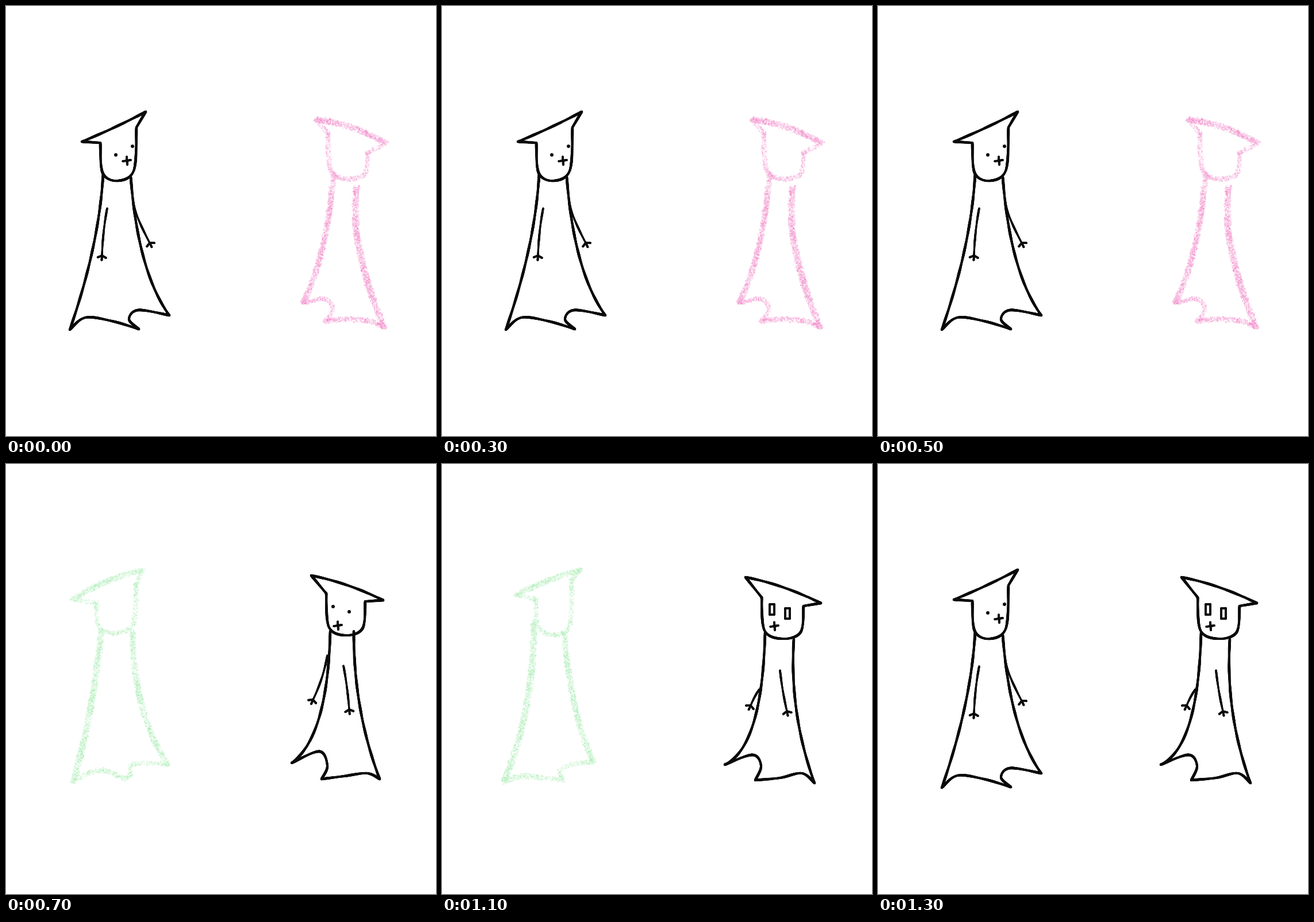
An HTML page with a canvas for the animation above (1400 ms loop, 748 by 748 pixels).

```html
<!DOCTYPE html>
<html lang="en">
<head>
<meta charset="utf-8">
<title>Two figures</title>
<style>
html, body { margin: 0; width: 100%; height: 100%; overflow: hidden; background: #fff; }
canvas { display: block; width: 100vw; height: 100vh; }
</style>
</head>
<body>
<canvas id="stage" width="748" height="748"></canvas>
<script>
const SIZE = 748, STEP = 100;
const PINK = ['#f5a3d6', '#ee7cc1', '#f8bfe2'], GREEN = ['#b6efbf', '#97e6a5', '#d3f6d4'];

// Key points. The outer side faces the stage edge, the inner side the other figure.
// hat: ear, middle, brim; face: outer temple, inner temple, chin;
// sides: neck, waist, foot; hem: two points of the wave, tail, two points of the hook.
const figures = {
  leftDots: {
    hat: '243,184 189,211 132,236', face: '164,238 227,211 195,304',
    outer: '169,292 151,422 111,563', inner: '217,297 240,440 284,538',
    hem: '138,542 184,548 231,562 214,545 230,529',
    arms: ['221,340 230,370 250,412', '176,352 170,392 167,434'],
    eyes: '191,259 220,244', mouth: '210,269'
  },
  leftBoxes: {
    hat: '252,181 194,206 136,231', face: '168,236 234,208 200,297',
    outer: '169,288 152,412 112,561', inner: '217,296 248,462 288,533',
    hem: '135,541 185,546 237,566 222,545 232,528',
    arms: ['225,345 237,379 248,415', '181,347 176,388 171,428'],
    eyes: '190,251 220,243', mouth: '215,267', boxes: true
  },
  rightDots: {
    hat: '531,194 594,211 656,237', face: '625,239 557,225 590,298',
    outer: '605,291 616,424 650,548', inner: '564,291 545,440 497,520',
    hem: '628,538 588,543 549,548 559,525 545,500',
    arms: ['559,333 549,373 534,410', '587,351 593,388 597,427'],
    eyes: '569,248 597,257', mouth: '577,281'
  },
  rightBoxes: {
    hat: '528,197 592,214 659,242', face: '629,247 556,232 592,304',
    outer: '612,305 617,432 648,555', inner: '562,293 542,450 492,523',
    hem: '626,538 588,546 545,550 555,525 540,506',
    arms: ['552,392 544,405 537,420', '588,359 593,395 600,430'],
    eyes: '574,253 601,260', mouth: '578,282', boxes: true
  },
  pinkHeavy: {
    hat: '540,198 600,211 661,239', face: '629,255 560,222 594,301',
    outer: '610,315 615,425 657,558', inner: '570,290 551,418 517,516',
    hem: '630,548 595,545 556,548 569,527 555,510', ink: PINK, press: 1.3
  },
  pinkLight: {
    hat: '530,197 592,211 656,237', face: '620,251 555,225 590,298',
    outer: '604,305 613,425 648,549', inner: '567,282 552,412 512,508',
    hem: '625,541 585,539 545,542 566,517 545,496', ink: PINK, press: 1.25
  },
  greenWide: {
    hat: '237,185 176,204 117,235', face: '157,242 226,210 192,294',
    outer: '166,288 146,430 117,553', inner: '220,290 236,420 281,522',
    hem: '138,540 170,533 206,548 216,540 221,522', ink: GREEN, press: 1.05
  },
  greenNarrow: {
    hat: '240,184 182,204 128,228', face: '163,235 226,200 198,297',
    outer: '160,275 147,420 108,552', inner: '213,295 231,420 263,518',
    hem: '140,543 175,546 210,549 205,533 225,523', ink: GREEN, press: 1.05
  }
};

const show = [
  'leftDots pinkHeavy', 'leftBoxes pinkHeavy', 'leftBoxes pinkLight', 'leftDots pinkHeavy',
  'leftBoxes pinkLight', 'leftDots pinkHeavy', 'leftBoxes rightBoxes',
  'greenWide rightDots', 'greenNarrow rightBoxes', 'greenWide rightDots', 'greenWide rightBoxes',
  'greenNarrow rightBoxes', 'greenNarrow rightDots', 'leftDots rightBoxes'
].map(s => s.split(' '));

function random(seed) {
  return () => {
    seed = (seed + 0x6d2b79f5) | 0;
    let t = Math.imul(seed ^ (seed >>> 15), 1 | seed);
    t = (t + Math.imul(t ^ (t >>> 7), 61 | t)) ^ t;
    return ((t ^ (t >>> 14)) >>> 0) / 4294967296;
  };
}

const points = s => s.split(' ').map(p => p.split(',').map(Number));
const polar = ([x, y], angle, r) => [x + Math.cos(angle) * r, y + Math.sin(angle) * r];

// Spline samples through p; three points make a plain parabola.
function curve(p, gap) {
  const n = p.length, out = [];
  const beyond = (a, b, c) => n === 3 ? [0, 1].map(j => 3 * a[j] - 3 * b[j] + c[j]) : a;
  const q = [beyond(p[0], p[1], p[2]), ...p, beyond(p[n - 1], p[n - 2], p[n - 3])];
  const mix = (a, b, c, d, t) =>
    b + t / 2 * (c - a + t * (2 * a - 5 * b + 4 * c - d + t * (3 * (b - c) + d - a)));
  for (let i = 1; i < n; i++) {
    const [a, b, c, d] = q.slice(i - 1, i + 3);
    const steps = Math.ceil(Math.hypot(c[0] - b[0], c[1] - b[1]) / gap);
    for (let k = 0; k < steps; k++) out.push([0, 1].map(j => mix(a[j], b[j], c[j], d[j], k / steps)));
  }
  out.push(p[n - 1]);
  return out;
}

// The outline shared by all figures: strokes with a crayon width and a pressure.
function outline(f) {
  const [hat, face, outer, inner, hem] = [f.hat, f.face, f.outer, f.inner, f.hem].map(points);
  const [outTemple, inTemple, chin] = face;
  const jaw = ([x, y]) => [x + .14 * (chin[0] - x), y + .8 * (chin[1] - y)];
  return [
    [hat, 10, 1],
    [[hat[0], inTemple], 8, .8],
    [[hat[2], outTemple], 8, .6],
    [[outTemple, jaw(outTemple), chin, jaw(inTemple), inTemple], 8, .75],
    [outer, 11, 1],
    [inner, 10, 1],
    [[outer[2], ...hem.slice(0, 3)], 9, .8],
    [[...hem.slice(2), inner[2]], 8, .75]
  ];
}

function details(f) {
  const lines = [], [[mx, my]] = points(f.mouth);
  for (const arm of f.arms.map(points)) {
    const [, elbow, hand] = arm;
    const angle = Math.atan2(hand[1] - elbow[1], hand[0] - elbow[0]);
    lines.push(arm);
    for (const spread of [-1.1, 0, 1.1]) lines.push([hand, polar(hand, angle + spread, 8)]);
  }
  lines.push([[mx - 7, my + 1], [mx + 7, my - 1]], [[mx, my - 7], [mx + 1, my + 7]]);
  if (f.boxes) for (const [x, y] of points(f.eyes)) {
    const box = [[-4, -9], [4, -9], [4, 9], [-4, 9]].map(([dx, dy]) => [x + dx, y + dy]);
    box.forEach((p, i) => lines.push([p, box[(i + 1) % 4]]));
  }
  return lines;
}

function drawPen(g, f) {
  const dot = (x, y, r) => {
    g.beginPath();
    g.arc(x, y, r, 0, Math.PI * 2);
    g.fill();
  };
  const line = (p, r) => curve(p, .6).forEach(([x, y], i) => dot(x, y, r + .2 * Math.sin(i * .09)));
  g.fillStyle = '#0c0c0c';
  outline(f).forEach(([p]) => line(p, 2.2));
  details(f).forEach(p => line(p, 1.75));
  if (!f.boxes) points(f.eyes).forEach(([x, y]) => dot(x, y, 3));
}

function drawCrayon(g, f) {
  const rnd = random(f.hat.length + f.press * 100);
  for (const [p, width, weight] of outline(f)) {
    const phase = rnd() * 6;
    for (const [i, [x, y]] of curve(p, 1).entries()) {
      const press = f.press * weight * (1 + .22 * Math.sin(i * .07 + phase) + .13 * Math.sin(i * .23));
      for (let k = width * .6 * press; k > rnd(); k--) {
        const [px, py] = polar([x, y], rnd() * Math.PI * 2, width * .56 * Math.sqrt(rnd()));
        const size = 1 + 1.6 * rnd() ** 2;
        g.globalAlpha = .2 + .35 * rnd();
        g.fillStyle = f.ink[rnd() < .25 * press ? 1 : rnd() < .35 ? 2 : 0];
        g.fillRect(px - size / 2, py - size / 2, size, size);
      }
    }
  }
}

const layers = {};
for (const [name, f] of Object.entries(figures)) {
  const c = layers[name] = document.createElement('canvas');
  c.width = c.height = SIZE;
  (f.ink ? drawCrayon : drawPen)(c.getContext('2d'), f);
}

const ctx = document.getElementById('stage').getContext('2d');
const start = performance.now();

function tick() {
  const i = Math.floor((performance.now() - start) / STEP) % show.length;
  ctx.fillStyle = '#fff';
  ctx.fillRect(0, 0, SIZE, SIZE);
  show[i].forEach(name => ctx.drawImage(layers[name], 0, 0));
  requestAnimationFrame(tick);
}
tick();
</script>
</body>
</html>
```
